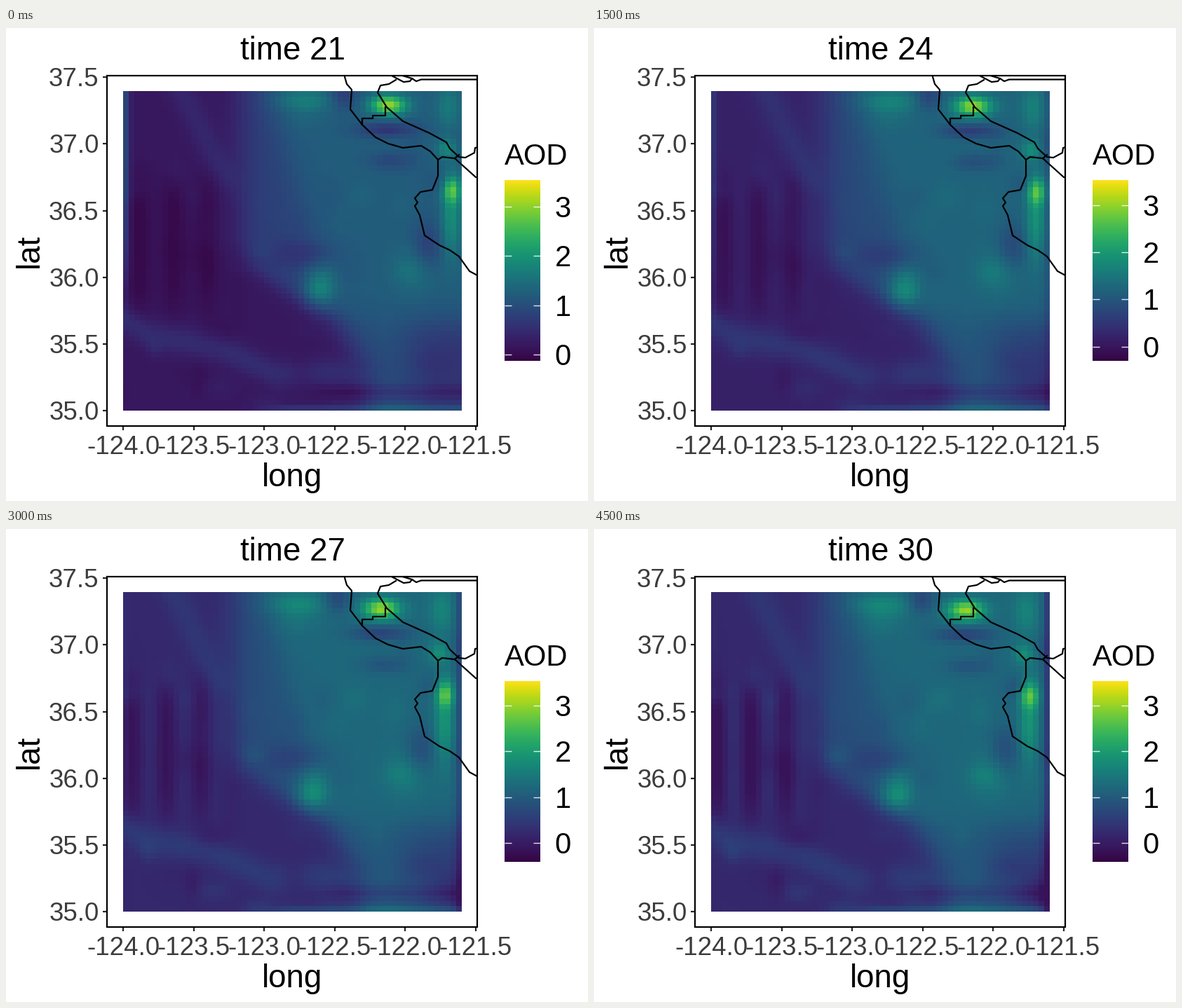
A matplotlib script for the animation above (5 s loop, 830 by 675 pixels).

```python
import numpy as np
import matplotlib.pyplot as plt
from matplotlib.animation import FuncAnimation
from matplotlib.colors import ListedColormap, to_rgb
from matplotlib.patches import Rectangle

W, H, DPI = 830, 675, 100
PX = 72 / DPI                      # points per pixel
STEPS, N = 10, 60
LEFT, RIGHT, TOP, BOTTOM = 167, 649, 90, 546
BAR_L, BAR_R, BAR_T, BAR_B = 711, 762, 218, 475.5
V_MAX = 3.517

plt.rcParams["font.family"] = "Liberation Sans"


def tone(c):
    """Re-encode sRGB values with a 1.8 gamma, which deepens the darks."""
    c = np.asarray(c)
    linear = np.where(c < .04045, c / 12.92, ((c + .055) / 1.055) ** 2.4)
    return linear ** (1 / 1.8)


CMAP = ListedColormap(tone(plt.get_cmap("viridis")(np.linspace(0, 1, 256))[:, :3]))
GREY, DARK = tone(to_rgb("#4D4D4D")), tone(to_rgb("#333333"))

# main highs and lows: x, y, x spread, y spread, height
SPOTS = [
    (425, 103, 30, 12, .13), (480, 97, 14, 14, -.12), (545, 110, 18, 10, .50),
    (542, 145, 30, 8, -.16), (548, 190, 22, 9, -.09), (630, 112, 12, 22, .12),
    (627, 172, 10, 10, .16), (635, 231, 9, 13, .32), (634, 270, 10, 42, .19),
    (600, 310, 15, 24, -.12), (425, 322, 36, 14, -.07), (447, 369, 17, 20, .22),
    (580, 345, 20, 24, .08),
]

COAST = [
    (482, 66), (486, 80), (493, 88), (491, 116), (508, 138), (527, 156),
    (545, 165), (566, 171), (592, 168), (605, 176), (616, 188), (616, 211),
    (608, 231), (591, 234), (583, 243), (587, 249), (583, 254), (590, 267),
    (597, 296), (618, 310), (633, 317), (646, 326), (661, 347), (674, 354),
]
BORDERS = [
    [(556, 74), (546, 80), (534, 82), (530, 92), (543, 113), (566, 133),
     (604, 150), (628, 163), (633, 172), (646, 184), (655, 185), (668, 178),
     (669, 171), (674, 170)],
    [(508, 138), (508, 129), (523, 129), (523, 125), (541, 125), (541, 113)],
    [(616, 188), (622, 184), (640, 186), (670, 213), (674, 213)],
    [(640, 186), (646, 181)],
    [(548, 67), (567, 77), (576, 76), (579, 72), (585, 76), (592, 73.5),
     (674, 73.5)],
    [(562, 67), (579, 72)],
]

rng = np.random.default_rng(7)
BLOBS = np.column_stack([rng.uniform(LEFT, RIGHT + 20, 70),
                         rng.uniform(TOP - 10, BOTTOM, 70),
                         rng.uniform(8, 18, 70), rng.uniform(8, 20, 70),
                         rng.normal(0, .018, 70)])

CX, CY = np.meshgrid(LEFT + (np.arange(N) + .5) * (RIGHT - LEFT) / N,
                     TOP + (np.arange(N) + .5) * (BOTTOM - TOP) / N)


def bell(d, width):
    return np.exp(-(d / width) ** 2 / 2)


def step(d, width):
    return 1 / (1 + np.exp(-d / width))


def bump(x, y, cx, cy, sx, sy, a):
    return a * bell(x - cx, sx) * bell(y - cy, sy)


def field(i):
    """AOD on the grid: a pattern carried to the south-west."""
    s = i / (STEPS - 1)
    x, y = CX + 15 * s, CY - 6 * s

    # low western water, then two slanting steps up towards the east
    front = np.interp(y, [80, 300, 345, 420, 480], [336, 334, 355, 462, 508])
    level = .17 + .11 * step(x - 375 - .3 * (y - 90), 14)
    level -= .06 * step(y - 415, 14) + .11 * step(y - 425, 14) * step(x - 578, 14)
    f = .085 + level * step(x - front, 14)

    # pale ridges: one across the south, one slanting in the north-west
    band = np.interp(x, [160, 210, 300, 385, 480], [410, 440, 455, 494, 490])
    f += .085 * bell(y - band, 15) * step(500 - x, 15)
    f += .06 * bell(x - 275 - .5 * (y - 140), 15) * step(225 - y, 10)

    # dark north-south stripes
    reach = step(315 - x, 14) * step(y - 215, 12) * step(400 - y, 14)
    f -= reach * (.04 + (.02 + .04 * s) * np.cos(2 * np.pi * (x - 190) / 49))

    for b in SPOTS:
        f += bump(x, y, *b)
    for b in BLOBS:
        f += (1 + s) * bump(x, y, *b)

    # borders: western rim leaves, eastern rim darkens, southern rim stays
    f += .22 * bell(x - 167, 6) * step(340 - y, 30)
    f += .13 * bell(CY - 546, 5) * step(CX - 380, 12)
    f -= .07 * bell(CY - 519, 7) * step(CX - 450, 12)
    f -= s * (.24 * bell(CX - 650, 7) + bump(CX, CY, 640, 520, 20, 26, .12))
    return 3.65 * np.maximum(f, 0) - .13 - .3 * s * np.maximum(-f, 0)


def low_end(i):
    return -.13 - .305 * np.sin(.21 * i)


fig = plt.figure(figsize=(W / DPI, H / DPI), dpi=DPI, facecolor="white")
ax = fig.add_axes([0, 0, 1, 1])


def label(x, y, s, size, color="black", **kw):
    return ax.text(x, y, s, fontsize=size * PX, color=color, va="baseline", **kw)


def line(xs, ys, width=2.2, color="black", **kw):
    return ax.plot(xs, ys, color=color, lw=width * PX, **kw)[0]


raster = ax.imshow(field(0), cmap=CMAP, extent=(LEFT, RIGHT, BOTTOM, TOP),
                   aspect="auto", interpolation="nearest")
ax.imshow(np.linspace(1, 0, 256)[:, None], cmap=CMAP, vmin=0, vmax=1,
          extent=(BAR_L, BAR_R, BAR_B, BAR_T), aspect="auto")

panel = Rectangle((144, 68), 528, 500, fill=False, ec="black", lw=2.2 * PX, zorder=5)
ax.add_patch(panel)
for path in [COAST] + BORDERS:
    line(*zip(*path), solid_joinstyle="round", zorder=4).set_clip_path(panel)

for k in range(6):
    tx, ty = 167 + 100.5 * k, 546 - 95.15 * k
    line([tx, tx], [568, 574], color=DARK, solid_capstyle="butt")
    line([138, 144], [ty, ty], color=DARK, solid_capstyle="butt")
    label(tx, 607.5, f"{-124 + k / 2:.1f}", 36.7, GREY, ha="center")
    label(132.5, ty + 13, f"{35 + k / 2:.1f}", 36.7, GREY, ha="right")

title = label(408.5, 45, "", 45.8, ha="center")
label(408, 654, "long", 45.8, ha="center")
label(46, 318, "lat", 45.8, ha="center", rotation=90, rotation_mode="anchor")
label(710.5, 195, "AOD", 41.7)

keys = [label(782.5, 0, str(v), 41.7) for v in range(4)]
marks = [[line([], [], 1.4, "white", alpha=.85, solid_capstyle="butt")
          for _ in range(2)] for v in range(4)]

ax.set_xlim(0, W)
ax.set_ylim(H, 0)
ax.axis("off")


def draw(i):
    low = low_end(i)
    title.set_text(f"time {21 + i}")
    raster.set_data(field(i))
    raster.set_clim(low, V_MAX)
    for v, (key, pair) in enumerate(zip(keys, marks)):
        y = BAR_B - (v - low) / (V_MAX - low) * (BAR_B - BAR_T)
        key.set_y(y + 15)
        for mark, x in zip(pair, (BAR_L, BAR_R - 10.3)):
            mark.set_data([x, x + 10.3], [y, y])
    return [title, raster, *keys]


anim = FuncAnimation(fig, draw, frames=STEPS, interval=500, repeat=True,
                     repeat_delay=0, init_func=lambda: draw(0))
plt.show()
```
